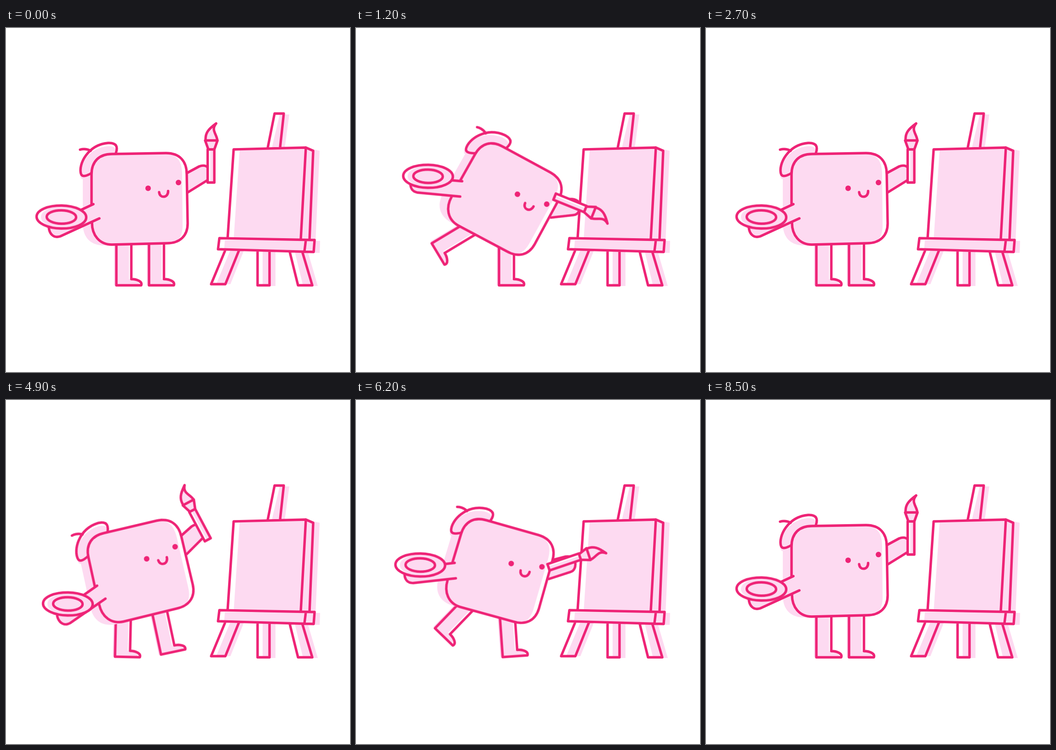
Recreate the animation shown at these times as an HTML page without scripts. Size 748x748 px, loop 8.8 s.

```html
<!DOCTYPE html>
<html lang="en">
<head>
<meta charset="utf-8">
<title>Little painter</title>
<style>
html, body { margin: 0; width: 100%; height: 100%; overflow: hidden; background: #fff; }
svg { display: block; width: 100%; height: 100%; }
.line { fill: none; stroke: #ee2376; stroke-width: 5.4; stroke-linecap: round; stroke-linejoin: round; }
.pale { fill: #fddaf1; }
.ink { fill: #ee2376; }
.white { fill: #fff; }

/* ten poses a second: each key is two poses after the last */
.move { animation: 4.4s steps(2) infinite; }
.body { transform-origin: 290.5px 371px; animation-name: lean; }
.arm { transform-origin: 203px 414px; animation-name: arm; }
.plate { transform-origin: 120px 411px; animation-name: level; }
.hand { transform-origin: 395px 336px; animation-name: hand; }
.back { transform-origin: 256px 471px; animation-name: kick; }
.front { transform-origin: 327px 471px; animation-name: step; }
.brush { transform-origin: 445.5px 336px; animation-name: paint; }

@keyframes lean {
  0%, 56.81%, 100% { transform: translate(0, 0) rotate(0deg); animation-timing-function: steps(1); }
  2.27%, 54.54% { transform: translate(.3px, .1px) rotate(-2deg); }
  6.81%, 50% { transform: translate(1.8px, .3px) rotate(-11deg); }
  11.36%, 45.45% { transform: translate(2.1px, .3px) rotate(-12.3deg); }
  15.9%, 40.9% { transform: translate(22.8px, .8px) rotate(16.8deg); }
  20.45%, 36.36% { transform: translate(38px, 2px) rotate(34deg); }
  25%, 31.81% { transform: translate(33.4px, 1px) rotate(29.4deg); }
}
@keyframes arm {
  0%, 56.81%, 100% { transform: rotate(0deg); animation-timing-function: steps(1); }
  2.27%, 54.54% { transform: rotate(.3deg); }
  6.81%, 50% { transform: rotate(2deg); }
  11.36%, 45.45% { transform: rotate(2.3deg); }
  15.9%, 40.9% { transform: rotate(1.5deg); }
  20.45%, 36.36%, 25%, 31.81% { transform: rotate(.6deg); }
}
@keyframes level {
  0%, 56.81%, 100% { transform: rotate(0deg); animation-timing-function: steps(1); }
  2.27%, 54.54% { transform: rotate(1.7deg); }
  6.81%, 50% { transform: rotate(9deg); }
  11.36%, 45.45% { transform: rotate(10deg); }
  15.9%, 40.9% { transform: rotate(-18.3deg); }
  20.45%, 36.36% { transform: rotate(-34.6deg); }
  25%, 31.81% { transform: rotate(-30deg); }
}
@keyframes hand {
  0%, 56.81%, 100% { transform: rotate(0deg); animation-timing-function: steps(1); }
  2.27%, 54.54% { transform: rotate(0deg); }
  6.81%, 50%, 11.36%, 45.45% { transform: rotate(-1deg); }
  15.9%, 40.9% { transform: rotate(-3deg); }
  20.45%, 36.36%, 25%, 31.81% { transform: rotate(-4deg); }
}
@keyframes kick {
  0%, 56.81%, 100% { transform: translate(0, 0) rotate(0deg); animation-timing-function: steps(1); }
  2.27%, 54.54% { transform: translate(0, 0) rotate(.2deg); }
  6.81%, 50% { transform: translate(-1px, -1px) rotate(1deg); }
  11.36%, 45.45% { transform: translate(-1px, -1px) rotate(1.3deg); }
  15.9%, 40.9% { transform: translate(-11.3px, -27.2px) rotate(44deg); }
  20.45%, 36.36% { transform: translate(-7px, -37px) rotate(64deg); }
  25%, 31.81% { transform: translate(-7.3px, -34.6px) rotate(59deg); }
}
@keyframes step {
  0%, 56.81%, 100% { transform: translate(0, 0) rotate(0deg); animation-timing-function: steps(1); }
  2.27%, 54.54% { transform: translate(1px, -1px) rotate(-2deg); }
  6.81%, 50% { transform: translate(6px, -6px) rotate(-10deg); }
  11.36%, 45.45% { transform: translate(7.3px, -7.4px) rotate(-12deg); }
  15.9%, 40.9% { transform: translate(1.8px, -1.4px) rotate(-4deg); }
  20.45%, 36.36%, 25%, 31.81% { transform: translate(0, 0) rotate(0deg); }
}
@keyframes paint {
  0%, 56.81%, 100% { transform: translate(0, 0) rotate(0deg); animation-timing-function: steps(1); }
  2.27%, 54.54% { transform: translate(-1px, -5px) rotate(-4deg); }
  6.81%, 50% { transform: translate(-6px, -29px) rotate(-25deg); }
  11.36%, 45.45% { transform: translate(-7px, -32px) rotate(-28deg); }
  15.9%, 40.9% { transform: translate(-27px, 27.5px) rotate(71.3deg); }
  20.45%, 36.36% { transform: translate(-9px, 40px) rotate(120deg); }
  25%, 31.81% { transform: translate(-13.5px, 30.5px) rotate(112deg); }
}
</style>
</head>
<body>
<svg viewBox="0 0 748 748">
  <defs>
    <path id="leg" d="M240 445V559.500H294C297 552 286 546 272.500 546V445"/>
    <path id="beret" d="M185 316C178 320 166 326 163 317C157 296 178 254 222 250C242 249 243 260 239 272"/>
    <path id="fore" d="M394 315L420 301C432 296 440 302 443 308C447 318 445 327 438 331L396 357"/>
    <path id="torso" d="M186 382V318C186 290 203 274 230 274L348 272C378 272 393 290 393 318L395 425C395 452 378 468 350 468L230 471C203 471 187 450 187 424"/>
    <g id="limb">
      <use href="#leg" class="pale" x="-5"/>
      <use href="#leg" class="line"/>
    </g>
  </defs>

  <!-- easel -->
  <path class="pale" d="M578 261L595 188H616L606 262ZM508 266L660 262L682 267L673 465L495 460ZM476 461L683 463L682 489L474 484ZM487 485L457 557H488L517 485ZM558 486V561H586V486ZM628 487L646 561H678L657 489Z"/>
  <path class="line" d="M569 261L584 186H604L596 260M482 455L495 264L652 260L641 459M652 260L668 267L660 460M464 457L671 461L669 487L461 481ZM652 461L649 485M476 485L446 557H477L506 485M547 486V559.500H573V486M617 487L635 559.500H666L645 489"/>

  <!-- painter -->
  <g class="move back"><use href="#limb"/></g>
  <g class="move front"><use href="#limb" x="71"/></g>
  <g class="move body">
    <g class="move hand">
      <use href="#fore" class="pale"/>
      <use href="#fore" class="line"/>
    </g>
    <use href="#torso" class="white"/>
    <path class="pale" d="M167 330C167 295 185 277 215 277L350 274C372 275 383 290 383 318L384 430C384 455 372 470 350 470L215 473C183 473 167 455 167 425Z"/>
    <use href="#beret" class="white"/>
    <use href="#beret" class="pale" x="-1" y="7"/>
    <use href="#beret" class="line"/>
    <path class="line" d="M161 264.500Q173 261 184 267"/>
    <use href="#torso" class="line"/>
    <circle class="ink" cx="309" cy="348.500" r="6"/>
    <circle class="ink" cx="375" cy="336" r="6"/>
    <path class="line" d="M333 357C334 371 353 370 352.500 354.500"/>
    <g class="move arm">
      <path class="pale" d="M190 383L203 414L118 453C103 458 94 447 93 433V420L140 405Z"/>
      <path class="line" d="M190 383L160 397M203 414L118 453C103 458 94 447 93 433"/>
      <g class="move plate">
        <g transform="rotate(1 120 411)">
          <ellipse class="white" cx="120" cy="411" rx="54" ry="25"/>
          <ellipse class="pale" cx="125" cy="411.500" rx="49" ry="24"/>
          <ellipse class="line" cx="120.500" cy="411" rx="54" ry="25"/>
          <ellipse class="line" cx="120.500" cy="411" rx="32" ry="14.500"/>
        </g>
      </g>
    </g>
  </g>

  <g class="move brush">
    <path class="white" d="M438 264H453V336H438Z"/>
    <path class="pale" d="M444 264H454V336H444Z"/>
    <path class="pale" d="M434 244C433 228 440 220 457 207.500C445 222 458 230 459.500 244L453 264H440Z"/>
    <path class="line" d="M438.500 264V336H453V264M433 244.500H460L453 264H440ZM434 244C433 228 440 220 457 207.500C445 222 458 230 459.500 244"/>
  </g>
</svg>
</body>
</html>
```
